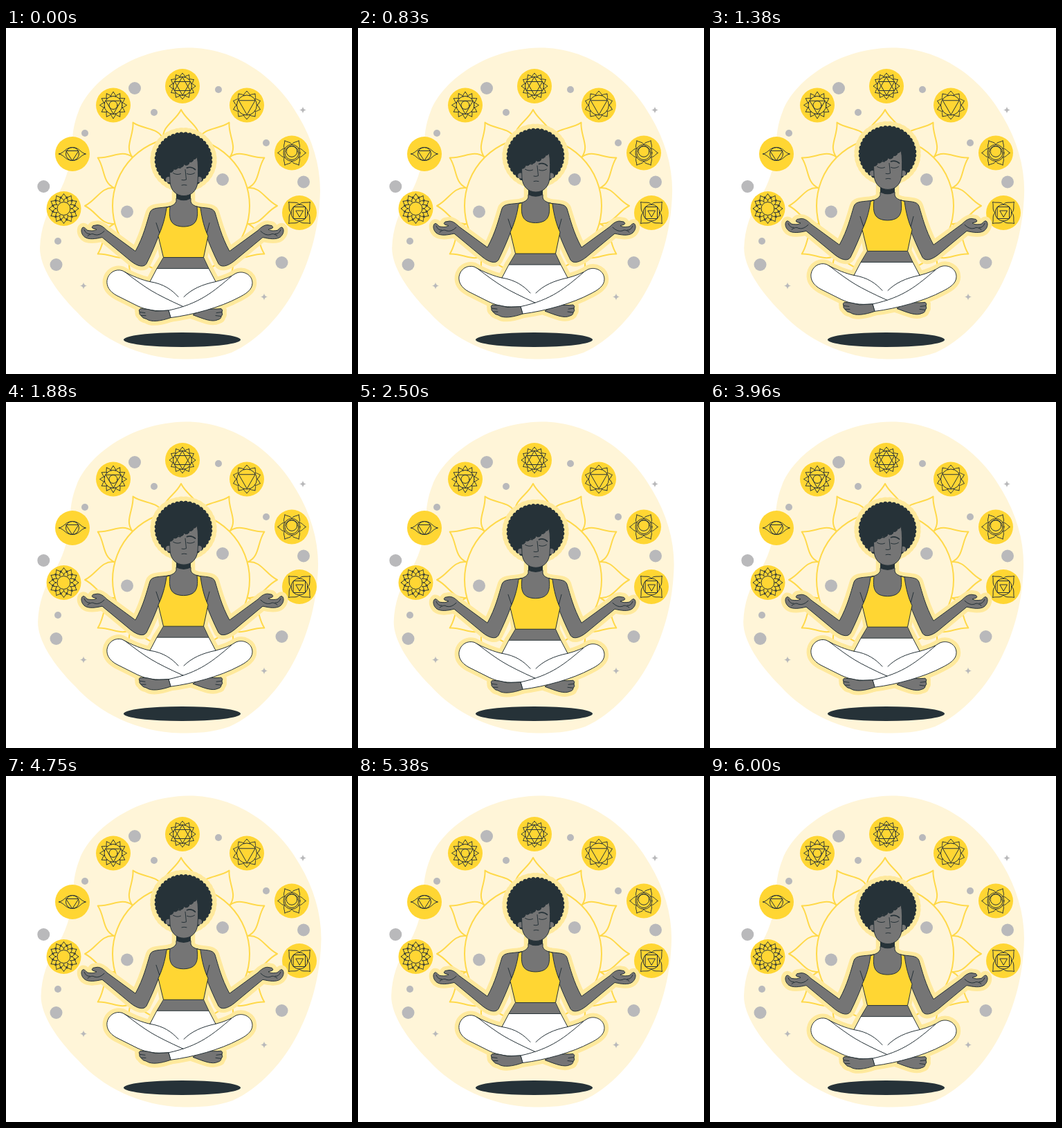
Recreate the animation shown at these times as an HTML page. Size 500 px wide and 500 px high, loop 6.04 s.

```html
<!DOCTYPE html>
<html lang="en">
<head>
<meta charset="utf-8">
<title>Floating meditation</title>
<style>
  html, body { margin: 0; height: 100%; overflow: hidden; background: #fff; }
  svg { display: block; width: 100vw; height: 100vh; }
  .line { fill: none; stroke: #263238; stroke-width: 1; stroke-linecap: round; stroke-linejoin: round; }
  .skin { fill: #757575; }
  .dark { fill: #263238; }
  .sun { fill: #ffd633; }
  .white { fill: #fff; }
  .grey { fill: #b9b9bb; }
  .edge { stroke: #263238; stroke-width: 1; stroke-linejoin: round; }
  .lotus { fill: none; stroke: #ffd94a; stroke-width: 2; stroke-linejoin: round; }
  .glow { fill: #ffe99c; stroke: #ffe99c; stroke-width: 12.5; stroke-linejoin: round; }
</style>
</head>
<body>
<svg id="stage" viewBox="0 0 500 500"></svg>
<script>
const TAU = Math.PI * 2;
const point = (radius, angle) =>
  `${(radius * Math.sin(angle)).toFixed(2)} ${(-radius * Math.cos(angle)).toFixed(2)}`;

const path = (d, cls, extra = '') => `<path class="${cls}" d="${d}" ${extra}/>`;
const circle = (x, y, r, cls) => `<circle class="${cls}" cx="${x}" cy="${y}" r="${r}"/>`;
const at = (x, y, content) => `<g transform="translate(${x} ${y})">${content}</g>`;
const mirror = content => `<g transform="translate(510 0) scale(-1 1)">${content}</g>`;

// Ring of onion-shaped petals: bases on the inner radius, tips on the outer one.
function petals(count, inner, outer, turn = 0) {
  const half = Math.PI / count;
  const base = inner * Math.cos(half);
  const side = inner * Math.sin(half);
  const along = k => base + (outer - base) * k;
  const polar = (r, s, a) => point(Math.hypot(r, s), a + Math.atan2(s, r));
  let d = '';
  for (let i = 0; i < count; i++) {
    const a = turn + i * TAU / count;
    const curve = sign => [[base, 1], [along(0.45), 1.1], [along(0.6), 0.32]]
      .map(([r, s]) => polar(r, sign * s * side, a));
    const [left, leftBulge, leftNeck] = curve(-1);
    const [right, rightBulge, rightNeck] = curve(1);
    d += `M${left}C${leftBulge} ${leftNeck} ${polar(outer, 0, a)}C${rightNeck} ${rightBulge} ${right}`;
  }
  return d;
}

function polygon(count, radius, turn = 0) {
  return 'M' + Array.from({ length: count }, (_, i) => point(radius, turn + i * TAU / count)).join('L') + 'Z';
}

function scallops(rx, ry, count) {
  const spot = i => {
    const a = i * TAU / count;
    return `${(256.5 + rx * Math.sin(a)).toFixed(2)} ${(190 - ry * Math.cos(a)).toFixed(2)}`;
  };
  let d = `M${spot(0)}`;
  for (let i = 1; i <= count; i++) d += `A3.7 3.7 0 0 1 ${spot(i)}`;
  return d + 'Z';
}

const ring = r => circle(0, 0, r, 'line');
const ink = d => path(d, 'line');
const down = r => ink(polygon(3, r, Math.PI));

const chakras = [
  [255, 84, ink(petals(12, 13.5, 19)) + ring(13.5) + ink(polygon(3, 13)) + down(13)],
  [155, 111.5, ink(petals(12, 13, 19.5)) + ring(13) + down(12.5) + ring(6)],
  [348, 111.5, ink(petals(10, 14.5, 20.5)) + ring(14.5) + down(13.5)],
  [96, 182, ink('M-19.5 0C-12 -1 -10 -9.5 0 -9.5S12 -1 19.5 0C12 1 10 9.5 0 9.5S-12 1 -19.5 0Z') +
    ring(9.5) + ink('M-9 -4.5H9L0 9.5Z')],
  [413, 180.5, ink(petals(6, 12, 20.5, Math.PI / 6)) + ring(12) + ring(10) + circle(0, -2, 7.8, 'line')],
  [83.5, 261, ink(petals(12, 15, 21.5)) + ink(petals(12, 11, 18, Math.PI / 12)) + ring(9.5)],
  [424, 267, ink(petals(4, 12, 22, Math.PI / 4)) + ring(12) + ink('M-8.5 -8.5H8.5V8.5H-8.5Z') + down(6)]
];

const dots = [
  [186, 87, 9], [307, 89, 5], [214, 122, 5], [114, 152, 5], [376, 166, 5], [54.3, 229, 9],
  [430, 222.5, 9], [313, 219, 9], [175, 265.5, 9], [75, 308, 5], [72.5, 342, 9], [398.5, 339, 9]
];
const sparkles = [[429, 118.5], [112, 372.5], [373, 388.5]];
const sparkle = 'M0 -5Q.7 -.7 5 0Q.7 .7 0 5Q-.7 .7 -5 0Q-.7 -.7 0 -5Z';

const blob = 'M262 28.5C330 28 391 70 423 128C443 162 454 198 454 235C453 286 441 331 422 369' +
  'C400 414 364 452 326 469C300 478 279 478.5 255 478.5C192 477 137 449 103 411C71 379 49 345 49 318' +
  'C50 290 58 268 72 246C84 226 92 205 95 175C96 155 97 140 105 120C120 80 180 30 262 28.5Z';

const hair = scallops(40.5, 38.8, 40);
const hairline = 'A4.5 4.5 0 0 0 ';
const face = 'M236.5 208' +
  ['242 203', '249 199', '257 196', '265 193', '271 189', '276 184'].map(p => hairline + p).join('') +
  'C278 196 278 208 277 222C276 234 268 242 257 242C246 242 238 234 237 222Z';
const arm = 'M236 257.5C222 260 211 258 208 266C203 282 199 300 187 322L146 292C141 287 137 284 132 284L126 285' +
  'Q122 288 127 289.5L131 290.5C128 293 123 292.5 119 292C116 292 115 287 111 287.5C108 290 108 296 113 301' +
  'C119 306 130 304 139 302L180 336C190 344 199 346 203 340C210 326 216 312 222 296Z';
const palm = 'M113 291Q116 298 121 297M118 300Q124 295 128 298Q135 300 142 293';
const torso = 'M246 236V250Q244 256 234 258L222 296L228 331L218 347H293L285 331L291 296L278 258Q268 256 267 250V236Z';
const shirt = 'M232 259L237 257.5C235 275 237 286 256.5 286.5C276 286 278 275 276 257.5L281 259' +
  'C283 275 287 290 292 300L285.5 331H227.5L220 300C225 290 230 275 232 259Z';
const legs = 'M218 347H293L303 366Q322 361 332 354C343 349 356 356 356 368C356 378 346 384 336 389' +
  'C310 403 270 414 238 418L235 407.5C215 409 203 407 190 401L160 386C149 380 145 372 146 364' +
  'C148 353 158 347 168 350C182 358 198 364 208 366Z';
const leftFoot = 'M235 407.5L216 408.5Q205 405 194 405Q191 407 193 410Q192 413 195 415Q197 419 203 420' +
  'C210 425 224 423 238 418Z';
const rightFoot = 'M284 405Q302 406 311 405Q314 407 312 410Q314 414 311 416Q311 420 306 421C298 425 286 420 270 414Z';

const figure =
  `<g class="glow"><path d="${hair}"/><path d="${torso}"/><path d="${arm}"/>${mirror(`<path d="${arm}"/>`)}` +
  `<path d="${legs}"/><path d="${leftFoot}"/><path d="${rightFoot}"/></g>` +
  path(arm, 'skin edge') + mirror(path(arm, 'skin edge')) +
  path(torso, 'skin') +
  path('M246 236V246Q257 251.5 267 246V236Z', 'dark') +
  path('M246 246V250Q244 256 234 258M267 246V250Q268 256 278 258M217 281L222 296M294 281L290 296' +
    'M227.5 331L218 347M285.5 331L293 347', 'line') +
  path(shirt, 'sun edge') +
  path(hair, 'dark') +
  circle(235, 218.5, 4, 'skin') + circle(279, 218.5, 4, 'skin') +
  path(face, 'skin edge') +
  path('M240.5 204Q245 200 252 201.5M261.5 201.5Q268 199 273.5 204', 'line', 'style="stroke-width:1.7"') +
  path('M241.5 209Q247 212.5 252.5 210M261.5 210Q267 212.5 272.5 209M259 204L260.5 218.5Q257 220 254 219' +
    'M254 226.5Q257 225.5 261 226.5', 'line') +
  path(palm, 'line') + mirror(path(palm, 'line')) +
  path(rightFoot, 'skin edge') +
  path(legs, 'white edge') +
  path(leftFoot, 'skin edge') +
  path('M208 366C228 369 240 378 249 388M303 366C283 370 268 377 257 388' +
    'M172 352Q195 370 210 379T256 402M326 358C300 380 280 398 235 407.5' +
    'M193 410L201 411M195 415L202 415M312 410L304 411M311 416L303 415', 'line');

const stage = document.getElementById('stage');
stage.innerHTML =
  `<g id="blob">${path(blob, '', 'fill="#fff5d8"')}</g>` +
  at(253, 257, path(petals(12, 99.5, 139), 'lotus') + circle(0, 0, 99, 'lotus')) +
  dots.map(([x, y, r]) => circle(x, y, r, 'grey')).join('') +
  sparkles.map(([x, y]) => at(x, y, path(sparkle, 'grey'))).join('') +
  chakras.map(([x, y, icon]) => at(x, y, circle(0, 0, 25, 'sun') + icon)).join('') +
  '<ellipse class="dark" cx="254.5" cy="450.5" rx="84.5" ry="10.5"/>' +
  `<g id="figure">${figure}</g>`;

const blobGroup = document.getElementById('blob');
const figureGroup = document.getElementById('figure');

const LOOP = 6040;
const REST = 0.6;
const SWAY = [0, -1, 2, -4, 4, -4, 4, -4, 2, -1, 0];

function sway(time) {
  const step = Math.min(time / 600, 9.9999);
  const i = Math.floor(step);
  return SWAY[i] + (SWAY[i + 1] - SWAY[i]) * (step - i);
}

function lift(time) {
  const phase = (time % 3000) / 1500;
  return REST - 10 * (1 - Math.abs(1 - phase));
}

function render(time) {
  blobGroup.setAttribute('transform', `translate(${sway(time)} 0)`);
  figureGroup.setAttribute('transform', `translate(0 ${lift(Math.min(time, 6000))})`);
}

const start = performance.now();
function tick(now) {
  render(Math.max(0, now - start) % LOOP);
  requestAnimationFrame(tick);
}
render(0);
requestAnimationFrame(tick);
</script>
</body>
</html>
```
